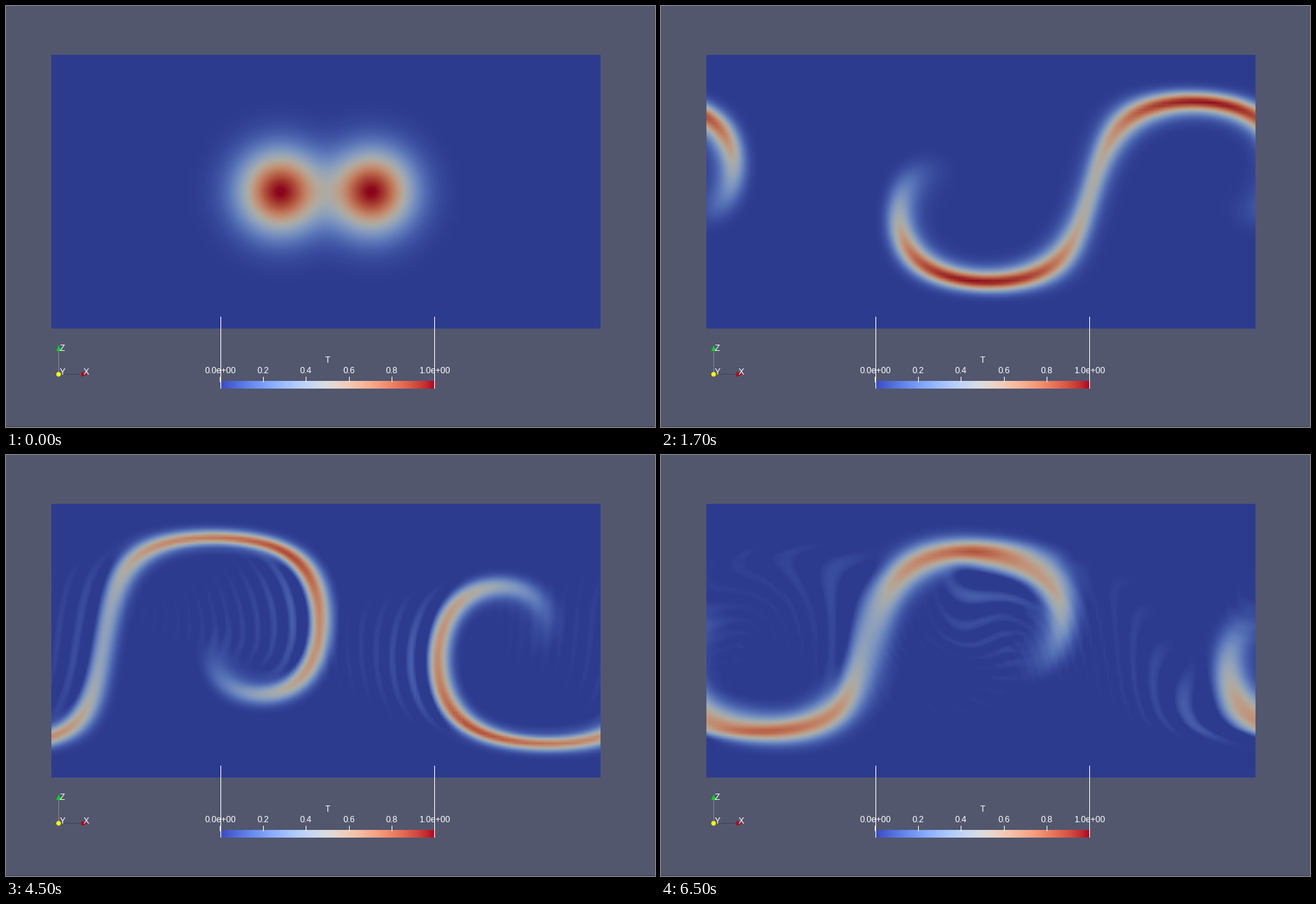
Animation, 929 px wide and 603 px high, one loop 8 s. Source, as a matplotlib script:

```python
import numpy as np
import matplotlib
import matplotlib.pyplot as plt
from matplotlib.animation import FuncAnimation
from matplotlib.patches import Circle, Polygon, Rectangle

W, H, DPI = 929, 603, 64
LEFT, TOP, PLOT_W, PLOT_H = 65, 70, 786, 392
NX, NY, BLOCK = 160, 80, 40
STEPS_PER_STAGE, STAGES = 100, 5
DIFFUSION = 0.0012

dx = 2 * np.pi / NX
X, Y = np.meshgrid(np.arange(NX) * dx, -np.pi / 2 + np.arange(NY) * dx)


def wind(t):
    """Deforming swirl that drifts once around the domain per unit time."""
    xs, swing = X - 2 * np.pi * t, 10 * np.cos(np.pi * t)
    u = swing * np.sin(xs) ** 2 * np.sin(2 * Y) + 2 * np.pi
    v = swing * np.sin(2 * xs) * np.cos(Y) ** 2
    return u, v


def tendency(q, t):
    u, v = wind(t)
    out = 0
    for speed, axis in ((u, 1), (v, 0)):
        a, b = np.roll(q, -1, axis), np.roll(q, 1, axis)
        far = np.roll(q, -2, axis) - np.roll(q, 2, axis)
        out = out - speed * (8 * (a - b) - far) / (12 * dx)
        out = out + DIFFUSION * (a + b - 2 * q) / dx ** 2
    return out


def advance(q, t, dt):
    k1 = tendency(q, t)
    k2 = tendency(q + dt / 2 * k1, t + dt / 2)
    k3 = tendency(q + dt / 2 * k2, t + dt / 2)
    k4 = tendency(q + dt * k3, t + dt)
    return q + dt / 6 * (k1 + 2 * k2 + 2 * k3 + k4)


def solve():
    q = sum(np.exp(-5 * ((X - c) ** 2 + Y ** 2))
            for c in (5 * np.pi / 6, 7 * np.pi / 6))
    fields, dt = [q], 1 / (STAGES * STEPS_PER_STAGE)
    for step in range((STAGES - 1) * STEPS_PER_STAGE):
        q = advance(q, step * dt, dt)
        if (step + 1) % STEPS_PER_STAGE == 0:
            fields.append(q)
    return fields


def triangulated(q):
    """Linear interpolation on triangles; diagonals flip from block to block."""
    gx = (np.arange(PLOT_W) + 0.5) / PLOT_W * NX
    gy = (PLOT_H - np.arange(PLOT_H) - 0.5) / PLOT_H * NY
    i, j = gx.astype(int), gy.astype(int)
    fx, fy = np.meshgrid(gx - i, gy - j)
    flip = i // BLOCK % 2 == 1
    near, far = np.where(flip, i + 1, i) % NX, np.where(flip, i, i + 1) % NX
    fx = np.where(flip, 1 - fx, fx)
    low, high = j[:, None], (j[:, None] + 1) % NY
    a, b, c, d = q[low, near], q[low, far], q[high, near], q[high, far]
    return np.where(fx > fy,
                    a + (b - a) * fx + (d - b) * fy,
                    a + (c - a) * fy + (d - c) * fx)


coolwarm = matplotlib.colormaps["coolwarm"]


def shaded(q):
    rgb = coolwarm(np.clip(triangulated(q), 0, 1))[..., :3]
    return rgb * (0.78, 0.775, 0.745)


def px(size):
    return size * 72 / DPI


fig = plt.figure(figsize=(W / DPI, H / DPI), dpi=DPI, facecolor="#52576e")
ax = fig.add_axes([0, 0, 1, 1])
ax.axis("off")

pictures = [shaded(q) for q in solve()]
plot = ax.imshow(pictures[0], interpolation="nearest", aspect="auto",
                 extent=(LEFT, LEFT + PLOT_W, TOP + PLOT_H, TOP))


def box(x, y, w, h, color):
    ax.add_patch(Rectangle((x, y), w, h, fc=color, lw=0, antialiased=False, zorder=3))


def label(x, baseline, text, size=12.2, **kw):
    ax.text(x, baseline, text, color="white", fontsize=px(size),
            family="Liberation Sans", va="baseline", zorder=5, **kw)


# Colour legend
BAR_L, BAR_R, BAR_T, BAR_B = 307, 613, 537, 548
ax.imshow(np.linspace(0, 1, 256)[None], cmap=coolwarm, aspect="auto",
          extent=(BAR_L, BAR_R, BAR_B, BAR_T), interpolation="nearest", zorder=2)
for x in (BAR_L, BAR_R):
    box(x, 445, 1, 103, "white")
box(306, 531, 1, 8, "white")
for n, text in enumerate(("0.0e+00", "0.2", "0.4", "0.6", "0.8", "1.0e+00")):
    x = BAR_L + n * (BAR_R - BAR_L) / 5
    if 0 < n < 5:
        box(round(x), 531, 1, 8, "white")
    label(x, 526, text, ha="center")
label(460.3, 511, "T", ha="center")

# Orientation axes
box(75, 494, 1, 33, "#7d8a8c")
box(75, 527, 34, 1, "#40445c")
ax.add_patch(Polygon([(75.5, 486), (72, 494), (79, 494)], fc="#00dc14", lw=0, zorder=4))
ax.add_patch(Polygon([(117, 527.5), (108, 524), (108, 531)], fc="#b4000c", lw=0, zorder=4))
ax.add_patch(Circle((75.3, 527.5), 3.3, fc="#ffff00", lw=0, zorder=4))
label(76.5, 494, "Z")
label(76.5, 528, "Y")
label(110.5, 528, "X")
box(0, 602, W, 1, "#3f4354")

ax.set(xlim=(0, W), ylim=(H, 0))


def update(tick):
    plot.set_data(pictures[(tick + 3) // 4])
    return [plot]


anim = FuncAnimation(fig, update, frames=16, interval=500, repeat=True, blit=False)
plt.show()
```
